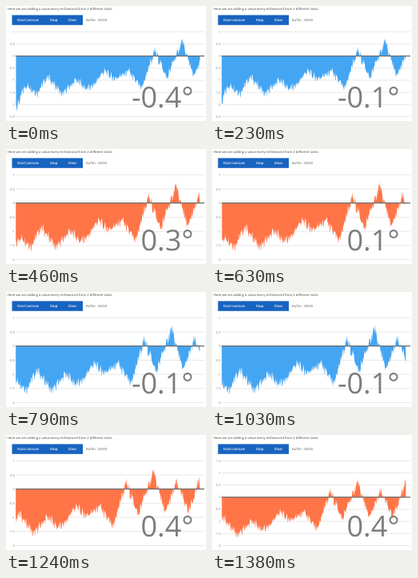
These frames come from a looping animation (250x144 px, 1400 ms). An HTML page:

```html
<!DOCTYPE html>
<html lang="en">
<head>
<meta charset="utf-8">
<title>Live chart</title>
<style>
  html, body { margin: 0; width: 100%; height: 100%; overflow: hidden; background: #fff; }
  svg { display: block; width: 100vw; height: 100vh; }
  text { font: 4.2px "Open Sans", "Noto Sans", sans-serif; text-rendering: geometricPrecision; fill: #666; }
  .bar { fill: #1763c0; }
  .btn text { font-size: 4.3px; font-weight: 600; fill: #fff; text-anchor: middle; }
  #axis text { text-anchor: end; fill: #888; }
  #axis path { stroke: #dedede; stroke-width: .7; }
  #zero { stroke: #6c6c6c; stroke-width: 1.3; }
  #value { font-size: 36px; fill: #7d7d7d; text-anchor: end; }
</style>
</head>
<body>
<svg viewBox="0 0 250 144">
  <text x="2" y="4.6" style="fill:#444">Here we are adding a value every millisecond from 2 different tasks</text>
  <g class="btn">
    <rect class="bar" x="7.5" y="11.4" width="88.5" height="12.4"/>
    <text x="27.5" y="19.2">Start Lecture</text>
    <text x="59.7" y="19.2">Stop</text>
    <text x="83" y="19.2">Clear</text>
  </g>
  <text x="100" y="19.2">Buffer: 20000</text>
  <g id="axis"></g>
  <path id="area"/>
  <path id="zero"/>
  <text id="value" x="234.7" y="126.8"></text>
</svg>
<script>
const LOOP = 1400, LEFT = 12, RIGHT = 242.5, TOP = 32.3, HEIGHT = 106.2, STEP = 0.5;
const BLUE = '#44a5f3', ORANGE = '#ff7548';
const SPEED = 0.0168, SKIP_AT = 1110, SKIP = 15;
const $ = id => document.getElementById(id);

// Turning points of the signal: position along the recording, level
const turns = [
  [14, -2.1], [24, -1.2], [39, -1.5], [52, -.85], [70, -1.6], [87, -1], [105, -1.4],
  [122, -.6], [138, -.95], [153, -.6], [169, -1.4], [186, .25], [201, -.9], [220, .6],
  [235, -.85], [249.5, .25], [264, -.8], [280, .6], [290, .1]
];

// Readout over time; equal times make a jump
const reading = [[0, -.4], [230, -.1], [460, .3], [790, -.1], [SKIP_AT, -.1], [SKIP_AT, .4], [LOOP, .4]];

function lookup(table, x) {
  let i = 1;
  while (i < table.length - 1 && table[i][0] <= x) i++;
  const [x0, y0] = table[i - 1], [x1, y1] = table[i];
  const k = Math.min(1, Math.max(0, (x - x0) / (x1 - x0)));
  return y0 + (y1 - y0) * k;
}

function noise(n) {
  const s = Math.sin(n * 12.9898) * 43758.5453;
  return (s - Math.floor(s)) * 2 - 1;
}

const level = n => lookup(turns, n * STEP)
  + .17 * noise(n) + .08 * noise(Math.floor(n / 3) + 700);

const scroll = t => t * SPEED + (t < SKIP_AT ? 0 : SKIP);

// The axis follows the oldest and newest samples
const maxAt = t => t < 1300 ? 1 : 1.5;
const minAt = t => t < 300 ? -2.5 : -2;

function drawAxis(max, min, y) {
  let html = '';
  for (let v = max; v >= min; v -= .5) {
    const at = y(v);
    html += `<path d="M${LEFT} ${at}H248"/><text x="11" y="${at + 1.5}">${v}</text>`;
  }
  $('axis').innerHTML = html;
  $('zero').setAttribute('d', `M${LEFT} ${y(0)}H248`);
}

function draw(t) {
  const max = maxAt(t), min = minAt(t);
  const y = v => TOP + (max - v) / (max - min) * HEIGHT;
  drawAxis(max, min, y);

  const shift = scroll(t), base = y(0);
  const first = Math.ceil((LEFT + shift) / STEP), last = Math.floor((RIGHT + shift) / STEP);
  let d = `M${first * STEP - shift} ${base}`;
  for (let n = first; n <= last; n++) d += `L${(n * STEP - shift).toFixed(2)} ${y(level(n)).toFixed(2)}`;
  $('area').setAttribute('d', d + `V${base}Z`);

  const value = lookup(reading, t);
  $('area').setAttribute('fill', value < 0 ? BLUE : ORANGE);
  $('value').textContent = value.toFixed(1) + '°';
}

const start = performance.now();
function tick() {
  draw((performance.now() - start) % LOOP);
  requestAnimationFrame(tick);
}
tick();
</script>
</body>
</html>
```
